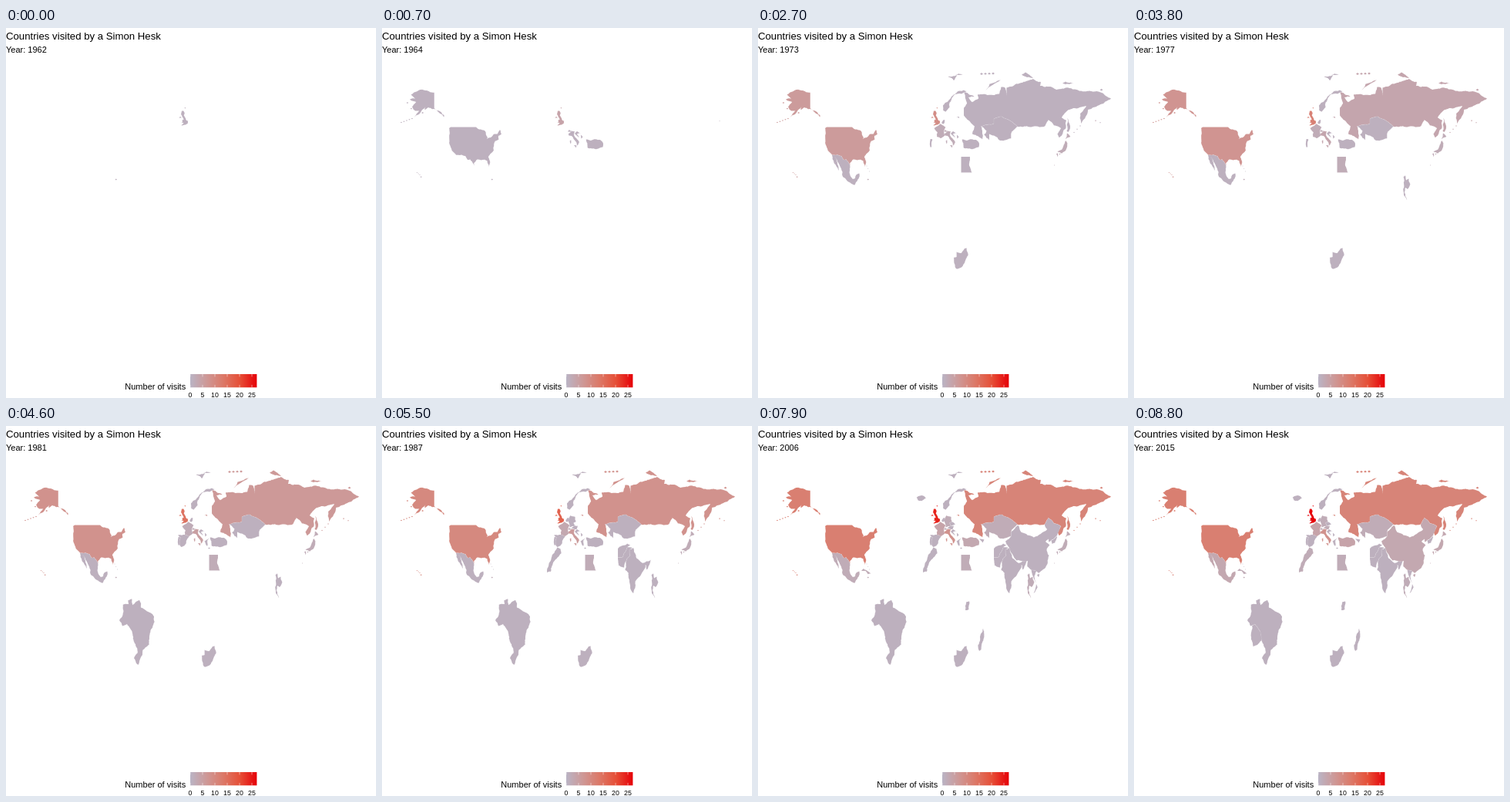
Animation of 480 by 480 pixels, one loop 10 s. Source, as an HTML page:

```html
<!DOCTYPE html>
<html lang="en">
<head>
<meta charset="utf-8">
<title>Countries visited</title>
<style>
html, body { margin: 0; width: 100%; height: 100%; overflow: hidden; background: #fff; }
svg { display: block; width: 480px; height: 480px; }
text { font-family: "Liberation Sans", Arial, Helvetica, sans-serif; font-size: 11px; fill: #000; }
.title { font-size: 13.2px; }
.tick { font-size: 8.8px; text-anchor: middle; }
#map path { stroke: #fff; stroke-opacity: .3; stroke-width: .3; }
</style>
</head>
<body>
<svg viewBox="0 0 480 480">
  <defs><linearGradient id="ramp"></linearGradient></defs>
  <text class="title" x="0" y="15">Countries visited by a Simon Hesk</text>
  <text id="year" x="0" y="32"></text>
  <g id="map"></g>
  <text x="154.3" y="469">Number of visits</text>
  <rect x="239" y="449" width="86.4" height="17.3" fill="url(#ramp)"/>
  <g id="legend"></g>
</svg>
<script>
const LOOP = 10000, STEP = 100, MAX = 27;
const years = [1962, 1963, 1964, 1965, 1967, 1969, 1971, 1973, 1974, 1977, 1979, 1981,
  1983, 1985, 1987, 1989, 1995, 1997, 1999, 2002, 2006, 2008, 2012, 2015];
// Steps at which each film's change begins; some change without a halfway step.
const starts = [0, 2, 6, 10, 14, 18, 22, 26, 31, 34, 38, 42,
  46, 50, 55, 58, 63, 66, 70, 74, 78, 81, 84, 87];
const instant = [0, 31, 55, 63];
const ramp = ["#bab4c5", "#ce9896", "#dc7867", "#e64e36", "#e60008"];

const $ = id => document.getElementById(id);
function add(parent, tag, attrs, text = "") {
  const el = document.createElementNS("http://www.w3.org/2000/svg", tag);
  for (const name in attrs) el.setAttribute(name, attrs[name]);
  el.textContent = text;
  return parent.appendChild(el);
}

// Displacement depends on place only, so neighbours share their borders.
function noise(x, y) {
  const n = Math.sin(x * 12.9898 + y * 78.233) * 43758.5453;
  return n - Math.floor(n) - .5;
}
function coast([ax, ay], [bx, by]) {
  const size = Math.hypot(bx - ax, by - ay);
  if (size < 2.5 || ax === bx || ay === by) return [[bx, by]];
  const mx = (ax + bx) / 2, my = (ay + by) / 2, amp = Math.min(size * .22, 2);
  const mid = [mx + noise(mx, my) * amp, my + noise(my, mx) * amp];
  return [...coast([ax, ay], mid), ...coast(mid, [bx, by])];
}

const shapes = [];
const shape = (visits, d) => shapes.push({ visits, el: add($("map"), "path", { d }) });

// Each outline is a few corners, joined by rough coasts.
function land(visits, ...outlines) {
  shape(visits, outlines.map(outline => {
    const pts = outline.trim().split(/\s+/).map(p => p.split(",").map(Number));
    return "M" + pts.flatMap((p, i) => coast(p, pts[(i + 1) % pts.length])).join(" ") + "z";
  }).join(""));
}
// A row of small islands between two points.
function isles(visits, x0, y0, x1, y1, n, r = .8) {
  let d = "";
  for (let i = 0; i < n; i++) {
    const k = n > 1 ? i / (n - 1) : 0;
    d += `M${x0 + (x1 - x0) * k - r} ${y0 + (y1 - y0) * k}l${r} ${-r * .7} ${r} ${r * .7} ${-r} ${r * .7}z`;
  }
  shape(visits, d);
}

const uk = [...years.keys(), 1, 11, 20];
const usa = [2, 3, 4, 6, 7, 7, 8, 10, 13, 13, 15, 19];
const russia = [4, 9, 9, 10, 11, 11, 12, 13, 15, 18, 20];
const italy = [1, 3, 9, 10, 11, 14, 17, 20];
const japan = [4, 6, 22];

// Americas
land(usa, `87,130 89,128.6 122,128.6 134,134 137,142 136,144 141,142 145.6,137.4 149.7,137.4 153,132 155,137.6
  151,140 151.5,144.6 146.8,146.8 144.5,155 145,158.5 138,167 139.7,176.6 139,180.6 136.4,172.3 133,170.8
  128.7,171.5 123,170.8 119.4,175 119.4,178.8 114.4,170.5 111,171 108.4,166.2 98.7,164.7 96,164.7 91.8,160.3 87.4,147.4`);
land(usa, `67.8,83.8 67.8,104 72,107 80.7,113.4 80.4,115.6 69.5,105.6 60,103 55.4,106.2 56,102.5 48,112 42,116
  48.2,107.5 43,107.5 39,102.5 44.2,96 36,92.5 43,91.4 37.5,86.4 49.4,80`);
isles(usa, 25, 122.5, 39, 117.5, 5, 1.2);
isles(usa, 45.5, 187.6, 49, 190.4, 3);
isles(usa, 50.7, 193.2, 50.7, 193.2, 1, 1.2);
isles(usa, 33, 97, 38, 104.6, 2, 1.3);
isles(usa, 52.7, 110, 52.7, 110, 1, 1.5);
isles(usa, 438, 120.7, 438, 120.7, 1);
land([6, 15, 23], `96,164.7 98.7,164.7 108.4,166.2 111,171 114.4,170.5 119.4,178.8 118.7,186.5 122.6,195.8 126,195
  127.3,190.4 131.4,188.6 130.7,195.2 125.3,203.7 116.3,199 109.6,192 109.5,186.5 100,167.4 104.8,185 98.4,174.5`);
isles([0, 7], 142.8, 196.5, 142.8, 196.5, 1, 1.3);
isles([3], 141, 179, 144.5, 186, 3, .6);
land([16, 19], `134,187.8 137,185 146.5,191.5 142.5,192.3 139.5,188`);
land([10], `163.3,224.2 158.3,226.3 159,231 151.7,231.8 151.5,244.7 147,252 151,259.5 157,257 163,265.4 165.6,279
  170,288 170.6,294.4 166,301.3 171.3,310 177,297 177.4,290.7 185.7,283.5 188,264 192.7,254 192,247 175,235.5
  173.3,226 164.4,232.2`);
land([21], `153,259.5 157,257 163,265.4 165.6,278 160,284 154.5,286 152,273.7`);

// Europe
land(uk, `227.3,126.3 235.7,124 236,120.5 234.2,120 230.8,113.4 231.8,110.2 230.4,107.6 228,107.6 227,112
  230.5,118.9 228.4,119.5 229,121.5 227.6,122.8 230.5,123.4`, `224.4,116.7 227.7,116.8 226,114.8`);
isles(uk, 232.4, 103.8, 232.4, 103.8, 1, 1);
land([19], `205.7,92.7 208,90.9 215,90.7 218,93.8 212.2,97.3 207.4,96.2`);
land([4], `240,100.3 240.5,107.3 243.4,108.8 248.5,103 248.4,97 255.2,86.2 264,85.5 270.8,82 267,80.5 260,81.8 250,91`,
  `246.5,63 258,61 254,68.3`, `256,61 260,59.3 266,60.5`);
land([11], `223.2,141.3 232,141 237.8,143 231.6,155.3 227.4,157 225.3,154.4 226.3,144.4`);
land([5], `223.6,144 226.3,144.4 225.3,154.4 223.2,154.4`);
land([3, 5, 13, 17], `228.5,130 232.2,127.6 236.4,124.3 243.4,128.7 241,134.8 242.3,139.6 237.5,143 232,141 232.7,135.2`);
land([6], `238.2,123.4 240,119.5 242.3,118.9 241,124.5`);
land([12, 17], `241,122.6 244.6,116 250.5,117.8 251.7,124.3 248.4,125.8 250.2,129.3 243,131.7 243.4,128.7`);
land([2, 5], `241,134.8 242.8,132 246.4,133.7`);
land([14, 23], `245.3,132.2 250.2,129.3 254,129.6 252.9,133.5 249.9,134`);
land([20], `248.4,125.8 251.7,124.3 256.2,127.4 250.2,129.3`);
land(italy, `242.3,139.6 241.9,137 246.4,133.5 249.9,134 249,139 256,148.2 252.9,152.7 252,148 246,140`,
  `248.7,152.5 252.2,152.2 251.7,155.5`, `243.8,146 245.4,145.6 244.8,150.6`);
land([1], `250,137.4 253,134 256.4,136.4 253,137.4 255.6,142.6`);
land([1], `256.4,135.2 260.5,141.8 258.2,143.5`);
land([11], `257.6,149.4 265,145 261.4,148 261,156 259.3,154`);
isles([11], 263.5, 158.5, 263.5, 158.5, 1, 1.5);
land([1, 18, 18, 22], `264.7,144.4 271,146 275.3,144.2 283,145 286.8,149 286.5,154.4 276.4,157 267,155.8`);
land([18], `287,146 293.5,147.5 291.5,151.5`);

// Africa
land([14, 23], `227,157.5 231.4,159.2 232.6,165.3 223.7,175 219,189 214,190 218.7,175 223.4,164.7`);
land([6, 9], `263.5,167 275,167 275,171.2 274,176 277.5,187.5 263.5,187.5`);
land([20], `268.9,239 270.5,228 274,227.3 273.5,238`);
land([20], `289.4,269 292,262.5 293.4,269.7 289.6,290 287,292 285.3,284.5`);
land([6], `254,297.8 255.8,310.3 257.6,312.4 264,310.6 272.7,294.4 270.8,285.5 268,286 263.5,292 257.6,290.6 257.6,297`);

// Asia
land(russia, `267.6,83.3 282,89.4 273,90 277.6,96 286,91.6 285,86.2 313,85.5 315.4,76.4 320,77 322.4,87.3 322.4,77.4
  356.6,66.1 367,70 366,75 379,76 387,80 399,77.4 411,79.6 446,84 458,91.6 444,99.3 428,106 426,113.4 419,124.3
  418,111 426,101.4 402.6,106.2 393.8,116 400,120 399.4,130 390.8,142.2 388.4,137.4 393,130 384,126.5 376.7,119.3
  372,127.6 336.6,128 325,119 316.5,115 306,118 306,124 289.4,127.6 291,144.4 278,137.4 281,127.6 267,113.4 267,104
  271,98`);
land(russia, `295.3,80.5 300.5,72.5 314.8,67.3 300,76.5`, `395,72 399,69.5 411,72.6`, `342,60 347,57.5 357,65 349,64`,
  `401.5,116.5 405,128.5 402.4,135 400.6,134`, `257.5,115.6 261,115 261,117.2`);
isles(russia, 290, 59.5, 305, 59, 4, 2);
isles(russia, 410, 135.5, 418, 127, 3, 1);
isles(russia, 438, 120, 444, 122.7, 2, 1);
isles(russia, 445.5, 80.2, 445.5, 80.2, 1, 2);
land([4, 18], `289.4,127.6 306,124 306,118 316.5,115 325,119 336.6,128 328.3,137.4 328.3,143.3 314,146 306,139.6
  300,137.4 300,145.5 293.3,138.5 296.5,133.5`);
land([14], `306,159 306,170.5 312.4,170 318.3,157 322.2,154.8 318,152.6`);
land([14], `306.7,180.6 314.2,183.6 316.5,175.5 321.8,168 321,160.3 324.8,158 318.3,157 312.4,170 306,170.5`);
land([12], `321,160.3 326,158 329.5,170 338,177.7 348.7,173.5 343.4,186.5 342,180 338.8,188.2 328.6,201.7
  328.3,210.4 326,217.2 324,214.8 319.8,190.8 315.4,187 316.5,175.5 321.8,168`);
land([8, 17], `349.5,193 352,191.2 353,197.4 356.6,195.6 358.4,202.8 354.8,209 352,207.2 351,213.7 354.3,223 350,217 350.1,202.8`);
land([17], `354.6,186.7 361.3,188.6 358.7,194 362.7,209.3 357.6,217 360.7,204 356.8,195`);
land([19, 21, 22], `321,149.4 328.3,143.3 328.3,137.4 337.2,128.7 341.3,137.4 357.8,144.6 375,133.7 372,127.6
  376.7,119.3 384,126.5 393,130 388.4,141.8 377.2,150.5 377,146.6 373,150 378.4,154.4 374.7,159.2 377.5,168
  373.7,182 364,190.8 361.3,188.6 354.6,186.7 349.2,182 350,175 335.4,174.5 326,158`, `362,193 365,191.8 364,196`);
land([19], `380.5,148.3 388,143 385.3,151.6 381.4,153`);
land(japan, `388.4,160.7 394.3,157.5 399.3,146 401.4,149.4 400,157 394.3,162.8`, `399,144.5 401,136.5 405.3,141`,
  `387,163 389.3,162.5 388.5,167.3`, `390.5,163 393,162 391.5,164.7`);
isles(japan, 384.6, 178, 384.6, 178, 1);

function color(visits) {
  const pos = visits / MAX * (ramp.length - 1), i = Math.min(Math.floor(pos), ramp.length - 2);
  return `color-mix(in srgb, ${ramp[i + 1]} ${(pos - i) * 100}%, ${ramp[i]})`;
}

ramp.forEach((c, i) => add($("ramp"), "stop", { offset: i / (ramp.length - 1), "stop-color": c }));
for (let n = 0; n <= 25; n += 5) {
  const x = 239 + n * 3.2;
  add($("legend"), "path", { d: `M${x} 449v3.4M${x} 462.9v3.4`, stroke: "#fff", "stroke-width": .5 });
  add($("legend"), "text", { class: "tick", x, y: 479 }, n);
}

const count = (visits, film) => visits.filter(v => v <= film).length;

function draw(step) {
  const film = starts.findLastIndex(s => s <= step);
  const halfway = step === starts[film] && !instant.includes(step);
  const shown = halfway ? film - 1 : film;
  $("year").textContent = "Year: " + years[shown];
  for (const { visits, el } of shapes) {
    const before = count(visits, shown);
    el.style.display = before ? "" : "none";
    el.style.fill = color((before + count(visits, film)) / 2);
  }
}

let last = -1;
function tick() {
  const step = Math.floor(performance.now() % LOOP / STEP);
  if (step !== last) draw(last = step);
  requestAnimationFrame(tick);
}
tick();
</script>
</body>
</html>
```
